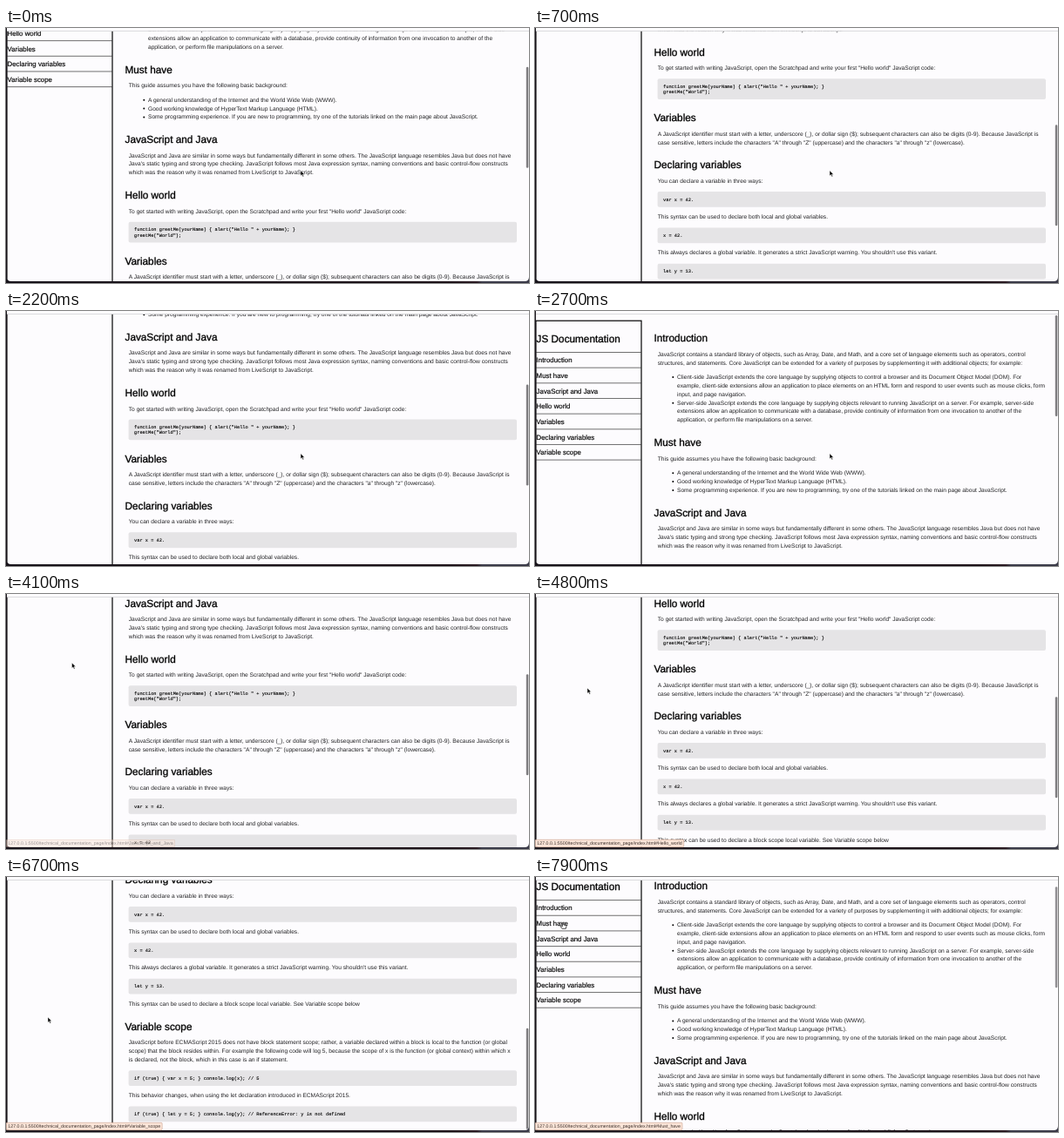
Recreate the animation shown at these times as an HTML page. Size 600 by 293 pixels, loop 8000 ms.

```html
<!DOCTYPE html>
<html>
<head>
<meta charset="utf-8">
<style>
html, body { margin: 0; width: 100%; height: 100%; overflow: hidden; background: #17141a; }
svg { display: block; width: 100vw; height: 100vh; }
text { font-family: "Liberation Sans", Arial, sans-serif; text-rendering: geometricPrecision; white-space: pre; }
.h { font-size: 11.78px; fill: #000; stroke: #000; stroke-width: .3px; }
.nav { font-size: 7.85px; fill: #000; stroke: #000; stroke-width: .15px; }
.p { font-size: 6.635px; fill: #222224; }
.code { font: 5.32px "Liberation Mono", "Courier New", monospace; fill: #000; stroke: #000; stroke-width: .12px; }
.tip { font-size: 5.3px; fill: #3c302c; }
</style>
</head>
<body>
<svg viewBox="0 0 600 293" preserveAspectRatio="none">
  <defs>
    <clipPath id="win"><path d="M1 0H600V286Q600 291 595 291H6Q1 291 1 286Z"/></clipPath>
    <clipPath id="view"><path d="M0 3.5H600V291H0Z"/></clipPath>
    <linearGradient id="desk">
      <stop offset="0" stop-color="#17131a"/><stop offset=".85" stop-color="#1d1218"/>
      <stop offset=".9" stop-color="#2a1a22"/><stop offset=".91" stop-color="#3a3a48"/>
    </linearGradient>
  </defs>
  <rect width="600" height="293" fill="url(#desk)"/>
  <g clip-path="url(#win)">
    <rect width="600" height="293" fill="#fdfcfe"/>
    <g clip-path="url(#view)"><g id="page"></g></g>
    <path d="M0 3.5H600" stroke="#d4d3d6" stroke-width=".8"/>
    <rect id="thumb" x="596.8" width="2.6" height="116" rx="1.3" fill="#7e7d80"/>
  </g>
  <g id="tip">
    <rect id="tipBox" x=".3" y="282.3" height="8.4" rx="1" fill="#fbe5d8" stroke="#c9a08c" stroke-width=".6"/>
    <text id="tipText" class="tip" x="2.3" y="288.4"></text>
  </g>
  <path id="arrow" d="M0 0V6.2L1.5 4.9L2.5 7.2L3.6 6.7L2.6 4.5H4.5Z" fill="#000" stroke="#fff" stroke-width=".5"/>
  <path id="hand" d="M-.7 .2Q0-.6 .7 .2V2.4L3.6 3.1Q4.2 3.3 4 4.2L3.4 6.8H-.8L-3 4.2Q-2.6 3.2-1.6 3.9L-.7 4.5Z"
    fill="#fff" stroke="#000" stroke-width=".7" stroke-linejoin="round"/>
</svg>
<script>
const $ = id => document.getElementById(id);
const page = $('page');

function add(tag, attrs, content = '') {
  const el = document.createElementNS('http://www.w3.org/2000/svg', tag);
  for (const k in attrs) el.setAttribute(k, attrs[k]);
  el.textContent = content;
  page.append(el);
}
// y is the middle of the capitals
const write = (cls, x, y, s) =>
  add('text', { class: cls, x, y: y + { h: 3.7, nav: 2.7, p: 2, code: 1.6 }[cls] }, s);
const head = (y, s) => write('h', 136.5, y, s);
const para = (y, ...lines) => lines.forEach((s, i) => write('p', 140.8, y + i * 9.9, s));
const item = (y, ...lines) => {
  add('circle', { cx: 158.3, cy: y + .1, r: 1 });
  lines.forEach((s, i) => write('p', 163, y + i * 9.8, s));
};
const code = (y, ...lines) => {
  add('rect', { x: 140.6, y, width: 445.4, height: 11.8 + 6 * lines.length, rx: 2, fill: '#e5e4e6' });
  lines.forEach((s, i) => write('code', 147, y + 9 + i * 6.2, s));
};

const NAV = ['Introduction', 'Must have', 'JavaScript and Java', 'Hello world',
  'Variables', 'Declaring variables', 'Variable scope'];
const NAV_TOP = 47.5, ROW = 17.66;
add('rect', { x: 1, y: 11.2, width: 121, height: 698, fill: 'none', stroke: '#000', 'stroke-width': 1.2 });
write('h', 1.6, 32.4, 'JS Documentation');
for (let i = 0; i < 8; i++)
  add('path', { d: `M1 ${NAV_TOP + i * ROW}H122`, stroke: '#333', 'stroke-width': .7 });
NAV.forEach((s, i) => write('nav', 1.6, 56.7 + i * ROW, s));

head(31.5, NAV[0]);
para(49.8,
  'JavaScript contains a standard library of objects, such as Array, Date, and Math, and a core set of language elements such as operators, control',
  'structures, and statements. Core JavaScript can be extended for a variety of purposes by supplementing it with additional objects; for example:');
item(76,
  'Client-side JavaScript extends the core language by supplying objects to control a browser and its Document Object Model (DOM). For',
  'example, client-side extensions allow an application to place elements on an HTML form and respond to user events such as mouse clicks, form',
  'input, and page navigation.');
item(105.6,
  'Server-side JavaScript extends the core language by supplying objects relevant to running JavaScript on a server. For example, server-side',
  'extensions allow an application to communicate with a database, provide continuity of information from one invocation to another of the',
  'application, or perform file manipulations on a server.');
head(151.5, NAV[1]);
para(169.7, 'This guide assumes you have the following basic background:');
item(186.2, 'A general understanding of the Internet and the World Wide Web (WWW).');
item(196, 'Good working knowledge of HyperText Markup Language (HTML).');
item(205.8, 'Some programming experience. If you are new to programming, try one of the tutorials linked on the main page about JavaScript.');
head(232, NAV[2]);
para(250,
  'JavaScript and Java are similar in some ways but fundamentally different in some others. The JavaScript language resembles Java but does not have',
  "Java's static typing and strong type checking. JavaScript follows most Java expression syntax, naming conventions and basic control-flow constructs",
  'which was the reason why it was renamed from LiveScript to JavaScript.');
head(295.8, NAV[3]);
para(314.3, 'To get started with writing JavaScript, open the Scratchpad and write your first "Hello world" JavaScript code:');
code(326.2, 'function greetMe(yourName) { alert("Hello " + yourName); }', 'greetMe("World");');
head(371.6, NAV[4]);
para(389.6,
  'A JavaScript identifier must start with a letter, underscore (_), or dollar sign ($); subsequent characters can also be digits (0-9). Because JavaScript is',
  'case sensitive, letters include the characters "A" through "Z" (uppercase) and the characters "a" through "z" (lowercase).');
head(425.7, NAV[5]);
para(443.8, 'You can declare a variable in three ways:');
code(456, 'var x = 42.');
para(485, 'This syntax can be used to declare both local and global variables.');
code(497.4, 'x = 42.');
para(526.4, "This always declares a global variable. It generates a strict JavaScript warning. You shouldn't use this variant.");
code(538.8, 'let y = 13.');
para(567.8, 'This syntax can be used to declare a block scope local variable. See Variable scope below');
head(594, NAV[6]);
para(612,
  'JavaScript before ECMAScript 2015 does not have block statement scope; rather, a variable declared within a block is local to the function (or global',
  'scope) that the block resides within. For example the following code will log 5, because the scope of x is the function (or global context) within which x',
  'is declared, not the block, which in this case is an if statement.');
code(644.2, 'if (true) { var x = 5; } console.log(x); // 5');
para(673.2, 'This behavior changes, when using the let declaration introduced in ECMAScript 2015.');
code(685.5, 'if (true) { let y = 5; } console.log(y); // ReferenceError: y is not defined');

// Keys are [ms, value...]; two keys at one time make a jump
const SCROLL = [[0, 103.5], [700, 268], [1450, 421.5], [1700, 422], [1800, 422], [2150, 230],
  [2450, 60], [2700, 0], [3200, 0], [3200, 20.9], [3800, 20.9], [3800, 221], [4200, 221], [4550, 0],
  [4800, 0], [4800, 285], [5000, 285], [5200, 0], [5300, 0], [5300, 360.5], [5450, 360.5], [5600, 0],
  [5750, 0], [5750, 414.7], [6050, 414.7], [6350, 0], [6600, 0], [6600, 422], [6800, 422], [7150, 0],
  [7400, 0], [7400, 20.9]];
const MOUSE = [[0, 338, 163.7], [2750, 338, 163.7], [3100, 24, 56], [3250, 24, 56], [3550, 75.5, 79],
  [4200, 75.5, 79], [4600, 60, 108], [5000, 60, 108], [5200, 55, 126], [5400, 55, 126],
  [5650, 50, 140], [6050, 50, 140], [6400, 48, 161], [7000, 48, 161], [7350, 32, 52.5]];

function at(keys, t) {
  const i = keys.findLastIndex(k => k[0] <= t), a = keys[i], b = keys[i + 1] || a;
  const f = a === b ? 0 : (t - a[0]) / (b[0] - a[0]);
  return a.slice(1).map((v, j) => v + (b[j + 1] - v) * f);
}
function hovered(t) {
  if (t < 0) return;
  const [x, y] = at(MOUSE, t), [s] = at(SCROLL, t);
  return x < 122 ? NAV[Math.floor((y + s - NAV_TOP) / ROW)] : undefined;
}

const FADE = [1, 1, 1, .8, .5, .2];
function draw(now) {
  const t = Math.floor(now % 8000 / 100) * 100;
  const [s] = at(SCROLL, t), [x, y] = at(MOUSE, t);
  page.setAttribute('transform', `translate(0 ${-s})`);
  $('thumb').setAttribute('y', Math.max(5, 2.8 + s * .405));
  $('thumb').setAttribute('opacity', t >= 7900 ? .85 : 1);

  const age = FADE.findIndex((_, k) => hovered(t - k * 100));
  $('tip').setAttribute('opacity', age < 0 ? 0 : FADE[age]);
  if (age >= 0) {
    const link = hovered(t - age * 100).replaceAll(' ', '_');
    $('tipText').textContent = '127.0.0.1:5500/technical_documentation_page/index.html#' + link;
    $('tipBox').setAttribute('width', $('tipText').getComputedTextLength() + 4);
  }
  for (const [id, on] of [['arrow', age !== 0], ['hand', age === 0]]) {
    $(id).setAttribute('transform', `translate(${x} ${y})`);
    $(id).setAttribute('visibility', on ? 'visible' : 'hidden');
  }
}

let start;
function loop(now) {
  start ??= now;
  draw(now - start);
  requestAnimationFrame(loop);
}
draw(0);
requestAnimationFrame(loop);
</script>
</body>
</html>
```
